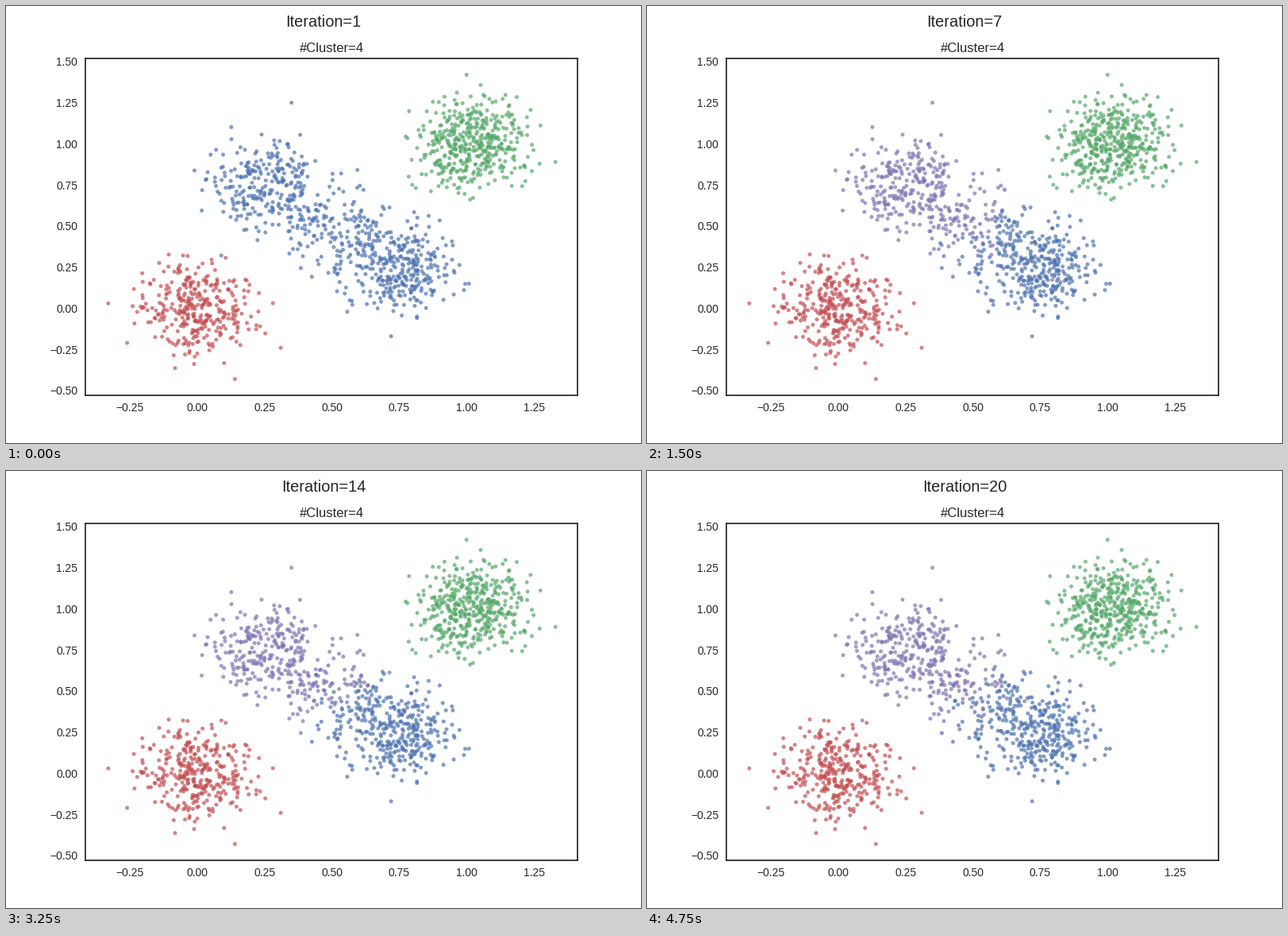
A matplotlib script that plays this animation: 800 px wide and 550 px high, repeating every 5000 ms.

```python
import numpy as np
import matplotlib.pyplot as plt
from matplotlib.animation import FuncAnimation
from matplotlib.colors import to_rgba

FRAMES, INTERVAL = 20, 250
INK = "0.15"
PALETTE = {"b": "#4C72B0", "g": "#55A868", "r": "#C44E52", "p": "#8172B2"}
RGBA = {key: to_rgba(color, 0.7) for key, color in PALETTE.items()}

CENTRES = np.array([(0, 0), (0.25, 0.75), (0.5, 0.5), (0.75, 0.25), (1.02, 1)])
COUNTS = [340, 250, 150, 320, 440]
SPREAD = (0.1, 0.135)
EXTREMES = np.array([(-0.33, 0.03), (-0.26, -0.21), (0.14, -0.43),
                     (0.31, -0.24), (0.35, 1.25), (0.72, -0.17),
                     (1.0, 1.42), (1.33, 0.89)])

plt.rcParams.update({
    "font.family": "Liberation Sans",
    "text.color": INK,
    "axes.edgecolor": INK,
    "axes.linewidth": 1.25,
    "xtick.color": INK,
    "ytick.color": INK,
})


def cloud(rng, centre, count, reach=2.7):
    """Normal cloud without far tails, scaled to the exact mean and spread."""
    z = rng.normal(size=(count * 2, 2))
    z = z[np.hypot(*z.T) < reach][:count]
    return centre + (z - z.mean(axis=0)) / z.std(axis=0) * SPREAD


rng = np.random.default_rng(14)
points = np.vstack([cloud(rng, c, n) for c, n in zip(CENTRES, COUNTS)]
                   + [EXTREMES])
gaps = EXTREMES[:, None] - CENTRES
home = np.concatenate([np.repeat(np.arange(len(COUNTS)), COUNTS),
                       np.hypot(gaps[..., 0], gaps[..., 1]).argmin(axis=1)])


def components(i):
    """Points that shape each cluster; purple splits off after the start."""
    names = np.array(list("rbbbg"))[home]
    if i > 0:
        x, y = points.T
        border = 0.25 * np.exp(-i / 2) - 0.05
        names[(home == 1) | ((home == 2) & (y - x > border))] = "p"
    return names


def log_weight(members):
    """Log of size times normal density, at every point."""
    cov = np.cov(members.T)
    d = points - members.mean(axis=0)
    distance = np.einsum("ij,jk,ik->i", d, np.linalg.inv(cov), d)
    return np.log(len(members)) - 0.5 * (np.log(np.linalg.det(cov)) + distance)


def sample_labels(i):
    """Draw each label from its posterior, as one Gibbs step does."""
    rng = np.random.default_rng(100 + i)
    names = components(i)
    keys = np.unique(names)
    scores = np.array([log_weight(points[names == k]) for k in keys])
    return keys[(scores + rng.gumbel(size=scores.shape)).argmax(axis=0)]


fig, ax = plt.subplots(figsize=(8, 5.5), dpi=100, facecolor="white")
heading = fig.suptitle("Iteration=1", fontsize=14.4)
ax.set_title("#Cluster=4", fontsize=12)
dots = ax.scatter(*points.T, s=13, linewidths=0)
ax.set_xticks(np.arange(-0.25, 1.26, 0.25))
ax.set_yticks(np.arange(-0.5, 1.51, 0.25))
ax.xaxis.set_major_formatter("{x:.2f}")
ax.yaxis.set_major_formatter("{x:.2f}")
ax.tick_params(length=0, pad=7, labelsize=10)
for label in ax.get_yticklabels():
    label.set_linespacing(1.0)
ax.set_xlim(-0.415, 1.412)
ax.set_ylim(-0.5266, 1.5193)


def update(i):
    heading.set_text(f"Iteration={i + 1}")
    dots.set_facecolor([RGBA[k] for k in sample_labels(i)])
    return heading, dots


anim = FuncAnimation(fig, update, frames=FRAMES, interval=INTERVAL,
                     init_func=lambda: update(0), repeat=True,
                     repeat_delay=0, blit=False)
plt.show()
```
